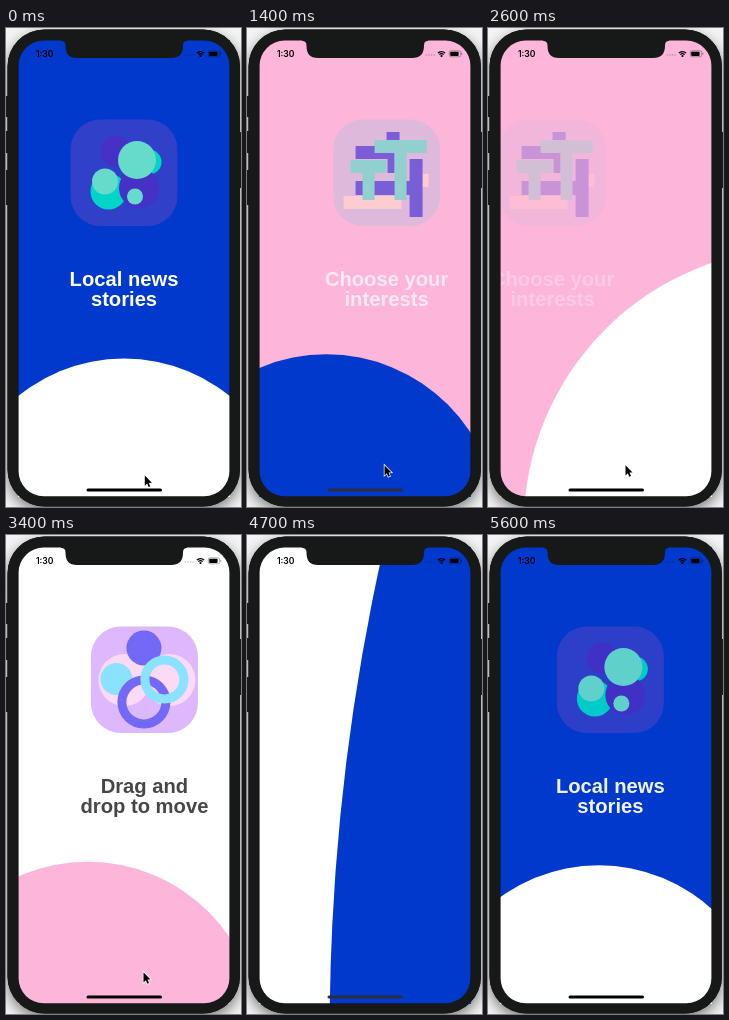
Write an HTML page with a canvas that moves like this. It is 235 px wide and 479 px high and loops after 5700 ms.

```html
<!DOCTYPE html>
<html lang="en">
<head>
<meta charset="utf-8">
<title>Onboarding</title>
<style>
  html, body { margin: 0; width: 100%; height: 100%; overflow: hidden; background: #f4f4f4; }
  canvas { display: block; width: 235px; height: 479px; }
</style>
</head>
<body>
<canvas id="stage"></canvas>
<script>
const W = 235, H = 479, LOOP = 5700, STEP = 100;
const MID = 118, PAGE_W = 210, RADIUS = 167.5, CENTER_Y = 498, POINT = 0.56;
const SLIDES = [
  { start: 250, span: 1800 },
  { start: 2142, span: 1944 },
  { start: 4200, span: 1700 }
];
const BLUE = '#0039cb', PINK = '#fdb5d9', WHITE = '#ffffff', SHELL = '#171818';
const VIOLET = '#443bd8', AQUA = '#66dacb';

const dpr = window.devicePixelRatio || 1;
function surface(canvas) {
  canvas.width = W * dpr;
  canvas.height = H * dpr;
  const c = canvas.getContext('2d');
  c.scale(dpr, dpr);
  return c;
}
const ctx = surface(document.getElementById('stage'));
const layer = document.createElement('canvas');
const art = surface(layer);

function disc(c, x, y, r, color) {
  c.fillStyle = color;
  c.beginPath();
  c.arc(x, y, r, 0, Math.PI * 2);
  c.fill();
}
function ring(c, x, y, r, width, color) {
  c.strokeStyle = color;
  c.lineWidth = width;
  c.beginPath();
  c.arc(x, y, r, 0, Math.PI * 2);
  c.stroke();
}
function block(c, x1, y1, x2, y2, color) {
  c.fillStyle = color;
  c.fillRect(x1, y1, x2 - x1, y2 - y1);
}
function rounded(c, x, y, w, h, r, color) {
  c.fillStyle = color;
  c.beginPath();
  c.roundRect(x, y, w, h, r);
  c.fill();
}

function bubbles(c) {
  disc(c, 110, 123, 15.5, '#4630c5');
  disc(c, 143, 134, 12.5, '#00d5c8');
  disc(c, 102.5, 163.5, 18, '#00d5c8');
  disc(c, 133, 160, 20, '#4630c5');
  disc(c, 131, 132, 19, AQUA);
  disc(c, 99, 153.5, 13, AQUA);
  disc(c, 129, 168.5, 8, AQUA);
}
function letters(c) {
  const peach = '#ffd5cb';
  block(c, 147, 146, 160, 159, peach);
  block(c, 75, 168, 133, 181, peach);
  block(c, 118, 104, 131, 113, VIOLET);
  block(c, 87, 118, 126, 131, VIOLET);
  block(c, 119, 131, 126, 145, VIOLET);
  block(c, 87, 153, 150, 167, VIOLET);
  block(c, 141, 131, 154, 189, VIOLET);
  block(c, 106, 112, 158, 125, AQUA);
  block(c, 126, 125, 138, 172, AQUA);
  block(c, 82, 132, 118, 145, AQUA);
  block(c, 94, 145, 106, 172, AQUA);
}
function rings(c) {
  const rose = '#fbccf3', cyan = '#5fd7ff', violet = '#4030f3';
  disc(c, 98, 145, 26, rose);
  disc(c, 143, 145, 26, rose);
  disc(c, 117.5, 113, 17.5, violet);
  disc(c, 90, 144, 16, cyan);
  ring(c, 117.5, 167, 22, 9, violet);
  ring(c, 138, 144.5, 19.5, 9, cyan);
}

const PAGES = [
  { bg: BLUE, tile: '#3040c8', ink: '#fff', lines: ['Local news', 'stories'], icon: bubbles },
  { bg: PINK, tile: '#d2bbdc', ink: '#fff', lines: ['Choose your', 'interests'], icon: letters },
  { bg: WHITE, tile: '#d09efc', ink: '#000', lines: ['Drag and', 'drop to move'], icon: rings }
];

// cubic-bezier(.33, 0, .243, 1)
function ease(x) {
  if (x <= 0) return 0;
  if (x >= 1) return 1;
  let lo = 0, hi = 1;
  for (let i = 0; i < 30; i++) {
    const s = (lo + hi) / 2, r = 1 - s;
    if (0.99 * s * r * r + 0.729 * s * s * r + s * s * s < x) lo = s; else hi = s;
  }
  return lo * lo * (3 - 2 * lo);
}

function drawPage(page, shift) {
  const alpha = 1 - 2.85 * Math.abs(shift) / PAGE_W;
  if (alpha <= 0) return;
  art.clearRect(0, 0, W, H);
  art.save();
  art.translate(shift, 0);
  rounded(art, 64.5, 91.5, 107, 106.5, 30, page.tile);
  page.icon(art);
  art.fillStyle = page.ink;
  art.font = 'bold 20.2px "Liberation Sans", Arial, sans-serif';
  art.textAlign = 'center';
  page.lines.forEach((line, i) => art.fillText(line, MID, 258 + i * 20));
  art.restore();
  ctx.globalAlpha = alpha;
  ctx.drawImage(layer, 0, 0, W, H);
  ctx.globalAlpha = 1;
}

// The disc swells to a straight edge at mid-screen, flips and shrinks back.
function drawDisc(p, color) {
  const grow = p < 0.5;
  const u = grow ? 2 * p : 2 - 2 * p;
  const r = RADIUS + POINT * (Math.pow(2, 15 * u) - 1);
  const offset = r - (1 - u) * RADIUS;
  disc(ctx, grow ? MID + offset : MID - offset, CENTER_Y, r, color);
}

function drawStatus() {
  ctx.fillStyle = '#000';
  ctx.font = '600 8.6px Inter, Roboto, sans-serif';
  ctx.textAlign = 'center';
  ctx.fillText('1:30', 38.7, 28.9);
  for (let i = 0; i < 4; i++) disc(ctx, 179.3 + i * 2.6, 27, 0.8, 'rgba(0,0,0,.25)');
  ctx.lineWidth = 1.2;
  ctx.strokeStyle = '#000';
  for (const r of [2.9, 5]) {
    ctx.beginPath();
    ctx.arc(194.5, 28.6, r, -Math.PI * 0.76, -Math.PI * 0.24);
    ctx.stroke();
  }
  disc(ctx, 194.5, 28, 1.1, '#000');
  ctx.strokeStyle = 'rgba(0,0,0,.45)';
  ctx.lineWidth = 0.7;
  ctx.beginPath();
  ctx.roundRect(202.3, 22.8, 11.4, 6, 1.7);
  ctx.stroke();
  rounded(ctx, 203.2, 23.7, 8.4, 4.2, 0.9, '#000');
  block(ctx, 214.4, 24.8, 215.2, 26.8, 'rgba(0,0,0,.45)');
}

function shellPath() {
  ctx.beginPath();
  ctx.roundRect(1.5, 1.5, 232.5, 477, 37);
}

function drawBackdrop() {
  block(ctx, 0, 0, W, H, '#f4f4f4');
  for (const [y, h] of [[68, 21], [103, 22], [142, 35]]) block(ctx, 0, y, 4, y + h, '#222');
  block(ctx, 231, 104, W, 160, '#222');
  ctx.save();
  ctx.shadowColor = 'rgba(0,0,0,.5)';
  ctx.shadowBlur = 14 * dpr;
  ctx.shadowOffsetY = 5 * dpr;
  ctx.fillStyle = SHELL;
  shellPath();
  ctx.fill();
  ctx.restore();
}

function drawBezel() {
  ctx.fillStyle = SHELL;
  shellPath();
  ctx.roundRect(12.6, 12.6, 210.8, 455.6, 25);
  ctx.fill('evenodd');

  ctx.beginPath();
  ctx.moveTo(55, 12);
  ctx.lineTo(55, 12.7);
  ctx.quadraticCurveTo(59.5, 13, 59.5, 17.5);
  ctx.bezierCurveTo(59.5, 26, 63, 30, 71, 30);
  ctx.lineTo(165, 30);
  ctx.bezierCurveTo(173, 30, 177, 26, 177, 17.5);
  ctx.quadraticCurveTo(177, 13, 181, 12.7);
  ctx.lineTo(181, 12);
  ctx.fill();
}

function drawCursor(t) {
  if (t >= 4000) return;
  const k = Math.min(1, t / 600);
  ctx.save();
  ctx.translate(138.8 - 1.3 * k, 447.5 - 10.3 * k);
  ctx.beginPath();
  ctx.moveTo(0, 0);
  for (const [x, y] of [[0, 10.2], [2.3, 8], [3.9, 11.6], [5.5, 10.9], [4, 7.4], [7, 7.2]]) ctx.lineTo(x, y);
  ctx.closePath();
  ctx.fillStyle = '#000';
  ctx.strokeStyle = '#fff';
  ctx.lineWidth = 1.4;
  ctx.stroke();
  ctx.fill();
  ctx.restore();
}

function draw(t) {
  let i = 0;
  while (i < 2 && t >= SLIDES[i + 1].start) i++;
  const p = ease((t - SLIDES[i].start) / SLIDES[i].span);
  const now = PAGES[i], next = PAGES[(i + 1) % 3], before = PAGES[(i + 2) % 3];
  const bg = p < 0.5 ? now.bg : next.bg;
  const spot = p === 0 ? before.bg : p < 0.5 ? next.bg : now.bg;

  drawBackdrop();
  ctx.save();
  ctx.beginPath();
  ctx.rect(12, 12, 212, 457);
  ctx.clip();
  block(ctx, 12, 12, 224, 469, bg);
  drawDisc(p, spot);
  drawPage(now, -p * PAGE_W);
  drawPage(next, (1 - p) * PAGE_W);
  drawStatus();
  rounded(ctx, 80.5, 460.5, 75.5, 3, 1.5, spot === BLUE ? '#2a2c40' : '#000');
  ctx.restore();
  drawBezel();
  drawCursor(t);
}

const origin = performance.now();
function tick() {
  const t = (performance.now() - origin) % LOOP;
  draw(Math.floor(t / STEP) * STEP);
  requestAnimationFrame(tick);
}
tick();
</script>
</body>
</html>
```
